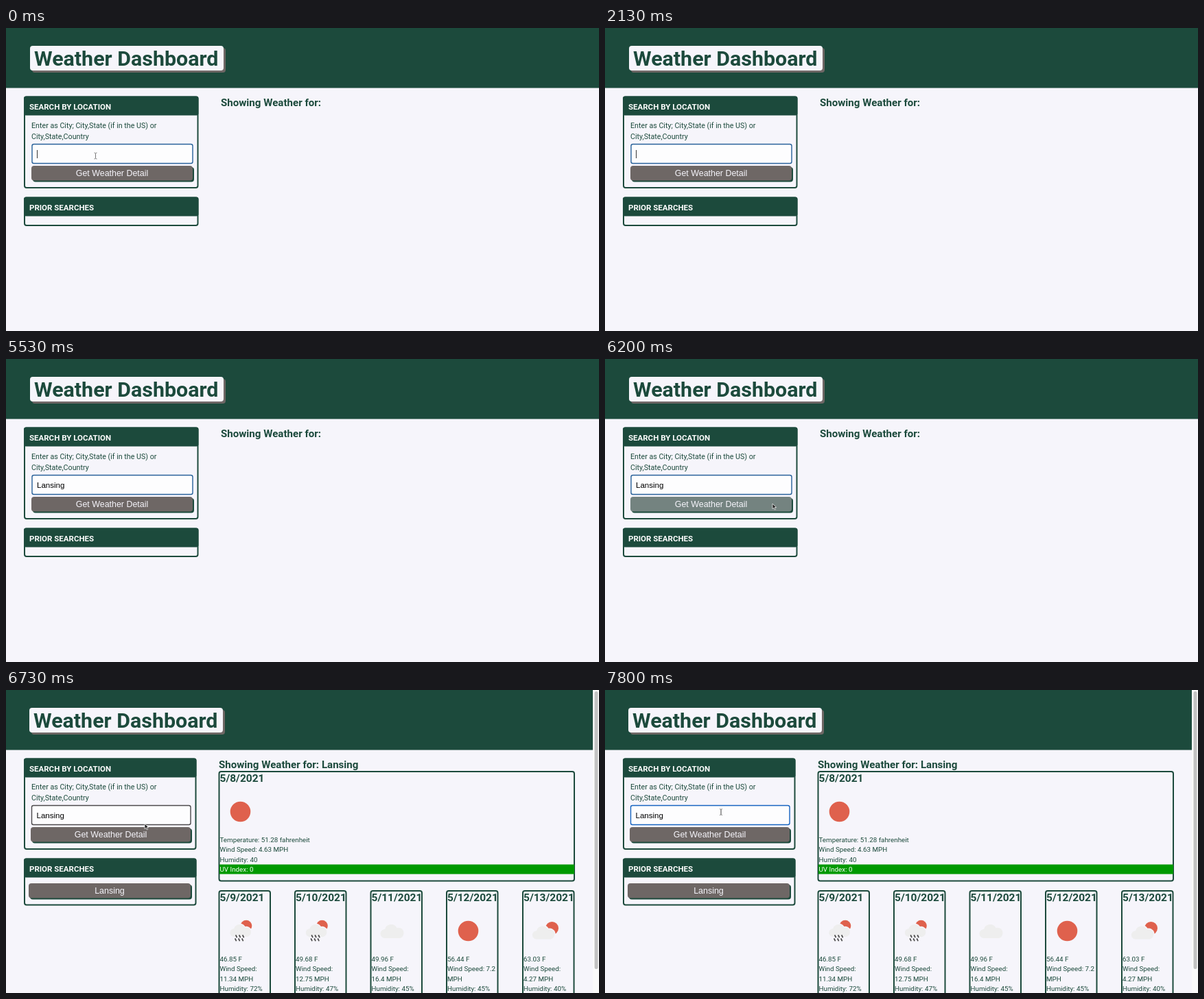
These frames come from a looping animation (864x442 px, 8000 ms). An HTML page:

```html
<!DOCTYPE html>
<html lang="en">
<head>
<meta charset="utf-8">
<title>Weather Dashboard</title>
<style>
  html, body { margin: 0; width: 100%; height: 100%; overflow: hidden; background: #f6f5fb; }
  svg { display: block; }
  text { font-family: Roboto, "Noto Sans", sans-serif; fill: #1c4a3c; white-space: pre; }
  .bold { font-weight: 700; }
  .ui { font-family: "Liberation Sans", Arial, sans-serif; }
</style>
</head>
<body>
<svg id="stage" width="864" height="442" viewBox="0 0 864 442"></svg>
<script>
const LOOP = 8000, CITY = 'Lansing';
const GREEN = '#1c4a3c', GRAY = '#6e6765', PAPER = '#f6f5fb', SUN = '#df614d';
const LETTERS = [4060, 4330, 4460, 4600, 4730, 4860, 5000];
const CARET = [0, 460, 930, 1460, 2130, 2460, 2930, 3460, 3930, 5530, 7330, 7800];
// time, x, y, shape
const POINTER = [
  [0, 130.5, 186.5, 'beam'], [1660, 0, 0, ''],
  [5660, 352, 190, 'arrow'], [5860, 292, 204, 'arrow'], [6060, 244, 211, 'arrow'],
  [6260, 224, 212, 'arrow'], [6400, 219.5, 211.5, 'arrow'], [6730, 202, 195, 'arrow'],
  [6930, 184, 185, 'beam'], [7130, 169, 178, 'beam']
];
const FORECAST = [
  [310, '5/9/2021', 'rain', ['46.85 F', 'Wind Speed:', '11.34 MPH', 'Humidity: 72%']],
  [420.5, '5/10/2021', 'rain', ['49.68 F', 'Wind Speed:', '12.75 MPH', 'Humidity: 47%']],
  [531, '5/11/2021', 'cloud', ['49.96 F', 'Wind Speed:', '16.4 MPH', 'Humidity: 45%']],
  [641.5, '5/12/2021', 'sun', ['56.44 F', 'Wind Speed: 7.2', 'MPH', 'Humidity: 45%']],
  [752.5, '5/13/2021', 'partly', ['63.03 F', 'Wind Speed:', '4.27 MPH', 'Humidity: 40%']]
];

const stage = document.getElementById('stage');
const pen = document.createElement('canvas').getContext('2d');
pen.font = '11.55px "Liberation Sans", Arial, sans-serif';

const box = (x, y, w, h, fill, extra = '') =>
  `<rect x="${x}" y="${y}" width="${w}" height="${h}" fill="${fill}" ${extra}/>`;
const text = (x, y, size, str, extra = '') =>
  `<text x="${x}" y="${y}" font-size="${size}" ${extra}>${str}</text>`;
const bold = (x, y, size, str, extra = '') => text(x, y, size, str, 'class="bold" ' + extra);
const circle = (x, y, r) => `<circle cx="${x}" cy="${y}" r="${r}" fill="${SUN}"/>`;
const frame = (x, y, w, h) =>
  box(x + 1, y + 1, w - 2, h - 2, 'none', `rx="3" stroke="${GREEN}" stroke-width="2"`);

function button(x, y, w, label, fill = GRAY, press = 0) {
  return box(x + 2, y + 2, w, 21.5, GREEN, 'rx="4"') +
    box(x + press, y + press, w, 21.5, fill, 'rx="4"') +
    text(x + press + w / 2, y + press + 15, 12.45, label,
      'class="ui" text-anchor="middle" style="fill:#f6f5fb"');
}

function panel(y, w, h, title) {
  return frame(26, y, w, h) + box(26, y, w, 28, GREEN, 'rx="3"') +
    bold(34, y + 19, 11.5, title, 'style="fill:#fff"');
}

function cloud(x, y, scale = 1) {
  return `<path transform="translate(${x} ${y}) scale(${scale})" fill="#eeeeee" stroke="${PAPER}"
    stroke-width="3" paint-order="stroke"
    d="M-11 10a6.5 6.5 0 0 1 0-13a9.5 9.5 0 0 1 17.5-2a7.6 7.6 0 0 1 4.5 15z"/>`;
}

function icon(kind, x) {
  if (kind === 'sun') return circle(x, 351.5, 14.8);
  if (kind === 'cloud') return cloud(x, 352);
  if (kind === 'partly') return circle(x + 11, 347.5, 9.5) + cloud(x - 1, 354, .95);
  let drops = '';
  for (let i = 0; i < 6; i++) {
    const dx = x - 7 + (i % 3) * 5 - (i > 2 ? 1 : 0), dy = i > 2 ? 363 : 358;
    drops += `M${dx} ${dy}l1.3 2.6`;
  }
  return circle(x + 8, 344, 8.3) + cloud(x, 351, .9) +
    `<path d="${drops}" stroke="#484848" stroke-width="1.7" stroke-linecap="round"/>`;
}

function results() {
  const lines = ['Temperature: 51.28 fahrenheit', 'Wind Speed: 4.63 MPH', 'Humidity: 40', 'UV Index: 0'];
  let out = frame(309.5, 118, 519.5, 161.5) + bold(311.5, 134, 15.5, '5/8/2021') +
    circle(341.5, 177.5, 14.8) + box(311, 254.5, 517, 14, '#009900');
  lines.forEach((line, i) =>
    out += text(311.5, 221.7 + i * 14.4, 9.8, line, i === 3 ? 'style="fill:#fff"' : ''));
  for (const [x, date, kind, rows] of FORECAST) {
    out += frame(x - .5, 292, 76.5, 170) + bold(x + 1.5, 308, 15.5, date) + icon(kind, x + 32);
    rows.forEach((row, i) => out += text(x + 1.5, 396 + i * 14.4, 9.8, row));
  }
  return out + box(855, 0, 9, 442, '#fafafa') + box(857.5, 2, 5, 405, '#c1c1c1', 'rx="2.5"');
}

function pointer(t) {
  const [, x, y, shape] = POINTER.findLast(p => p[0] <= t);
  const paths = {
    beam: `<path d="M-2-4.5q2 0 2 1.5v6q0 1.5-2 1.5M2-4.5q-2 0-2 1.5v6q0 1.5 2 1.5"
      fill="none" stroke="#777" stroke-width=".9"/>`,
    arrow: `<path d="M0 0v7.6l1.8-1.6 1.3 2.9 1.4-.6-1.3-2.8h2.5z"
      fill="#222" stroke="#fff" stroke-width=".7"/>`
  };
  return shape && `<g transform="translate(${x} ${y})">${paths[shape]}</g>`;
}

function scene(t) {
  const loaded = t >= 6730, searched = t >= 6600;
  const inset = loaded ? 1 : 0, narrow = loaded ? 3 : 0;
  const hover = t >= 6060 && !loaded, pressed = searched && !loaded;
  const typed = CITY.slice(0, LETTERS.filter(at => at <= t).length);
  const caretOn = !searched || t >= 7330 ? CARET.filter(at => at <= t).length % 2 : 0;
  const border = t >= 7330 ? '#1764c0' : searched ? '#4c4a4c' : '#28619a';
  const priorY = 246.5 - inset;

  let out = box(0, 0, 864, 442, PAPER) + box(0, 0, 864, 87.5, GREEN) +
    box(38 - inset, 29, 282, 36, GRAY, 'rx="4"') +
    box(35 - inset, 26, 282, 36, PAPER, 'rx="4"') +
    bold(41 - inset, 55, 30.4, 'Weather Dashboard') +
    panel(99.5, 254.5 - narrow, 134.5 - inset, 'SEARCH BY LOCATION') +
    text(37, 146 - inset, 10.7, 'Enter as City; City,State (if in the US) or') +
    text(37, 161.5 - inset, 10.7, 'City,State,Country') +
    box(38 - inset / 2, 169.5 - inset, 234 - narrow + inset / 2, 28, '#fdfdfe',
      `rx="2.5" stroke="${border}" stroke-width="1.4"`) +
    text(45 - inset / 2, 187.5 - inset, 11.55, typed, 'class="ui" style="fill:#000"');
  if (caretOn) {
    out += box(45 + pen.measureText(typed).width, 178 - inset, .9, 12, '#222');
  }
  out += button(37 - inset, 201 - inset, 235 - narrow + inset, 'Get Weather Detail',
      hover ? '#748380' : GRAY, pressed ? 1 : 0) +
    panel(priorY, 254.5 - narrow, searched ? 70 - inset : 42.5, 'PRIOR SEARCHES');
  if (searched) out += button(33.5 - inset / 2, priorY + 36.5, 238.5 - narrow + inset / 2, CITY);
  out += bold(313 - narrow, 114, 15.1, 'Showing Weather for:' + (searched ? ' ' + CITY : ''));
  if (loaded) out += results();
  return out + pointer(t);
}

let shown = '';
function tick() {
  const next = scene(performance.now() % LOOP);
  if (next !== shown) stage.innerHTML = shown = next;
  requestAnimationFrame(tick);
}
tick();
</script>
</body>
</html>
```
